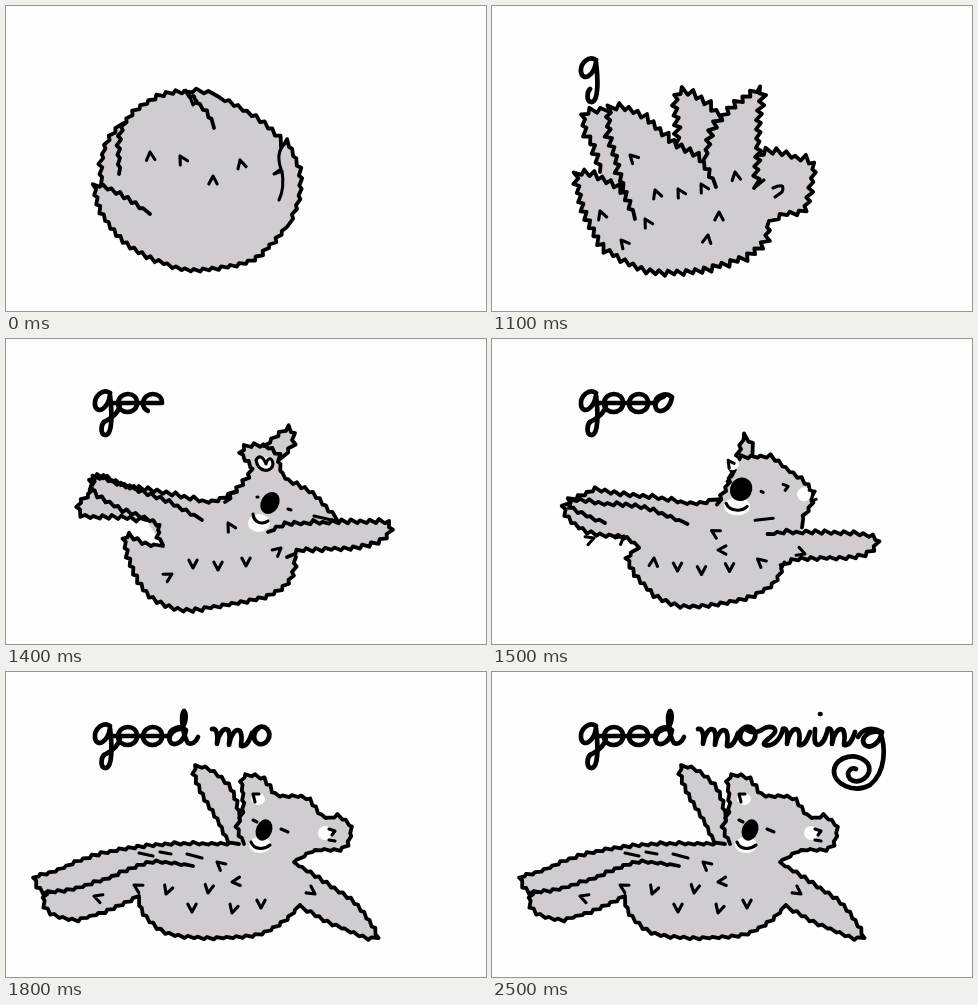
Write an HTML page that moves like this. It is 480 px wide and 305 px high and loops after 2.6 s.

```html
<!DOCTYPE html>
<html lang="en">
<meta charset="utf-8">
<title>good morning</title>
<style>
html, body { margin: 0; height: 100%; overflow: hidden; background: #fefdfe; }
svg { display: block; width: 100vw; height: 100vh; fill: none; stroke: #000; stroke-width: 3.8; stroke-linecap: round; stroke-linejoin: round; }
#fill { fill: #d0ccd0; stroke: none; }
#marks, #face { stroke-width: 3.1; }
#text { stroke-width: 4.7; }
.white { fill: #fff; stroke: none; }
.nose { fill: #000; stroke: none; }
</style>
<svg viewBox="0 0 480 305">
  <path id="fill"/><path id="line"/><path id="marks"/><g id="face"/><g id="text"/>
</svg>
<script>
const LOOP = 2600, STEP = 100, SAMPLES = 80;
const $ = id => document.getElementById(id);
const points = s => s.split(' ').map(p => p.split(',').map(Number));
const lerp = (a, b, u) => a.map((v, i) => v + (b[i] - v) * u);
const noise = n => { const v = Math.sin(n * 127.1) * 43758.5; return v - Math.floor(v); };

// Evenly spaced points along a line.
function resample(line, n) {
  const dist = [0];
  for (let i = 1; i < line.length; i++)
    dist.push(dist[i - 1] + Math.hypot(line[i][0] - line[i - 1][0], line[i][1] - line[i - 1][1]));
  const total = dist[dist.length - 1];
  n = n || Math.max(4, Math.round(total / 9));
  let i = 1;
  return Array.from({ length: n }, (_, k) => {
    const at = total * k / (n - 1);
    while (i < line.length - 1 && dist[i] < at) i++;
    return lerp(line[i - 1], line[i], (at - dist[i - 1]) / (dist[i] - dist[i - 1]));
  });
}

// Cardinal spline through the key points.
function smooth(keys) {
  const out = [], key = i => keys[Math.max(0, Math.min(keys.length - 1, i))];
  for (let i = 0; i < keys.length - 1; i++)
    for (let u = 0; u < 1; u += .125) {
      const [p, a, b, n] = [-1, 0, 1, 2].map(d => key(i + d)), v = 1 - u;
      out.push(a.map((_, c) => a[c] + (b[c] - a[c]) * u * u * (3 - 2 * u)
        + .35 * u * v * (v * (b[c] - p[c]) - u * (n[c] - a[c]))));
    }
  out.push(key(keys.length));
  return resample(out, SAMPLES);
}

// Jagged tufts on the outer side of a counterclockwise line.
function fur(line, size, seed) {
  const base = resample(line), last = base.length - 1;
  return base.flatMap((p, i) => {
    if (i === 0 || i === last) return [p];
    const [ax, ay] = base[i - 1], [bx, by] = base[i + 1];
    const len = Math.hypot(bx - ax, by - ay) || 1;
    const shift = ([x, y], d) => [x - (by - ay) / len * d, y + (bx - ax) / len * d];
    const tip = size * (.2 + .8 * noise(seed * 50 + i));
    return [shift(p, tip), shift(lerp(p, base[i + 1], .3), -size * .4)];
  });
}

const ellipse = (kind, x, y, rx, ry, turn = 0) =>
  `<ellipse class="${kind}" cx="${x}" cy="${y}" rx="${rx}" ry="${ry}" transform="rotate(${turn} ${x} ${y})"/>`;
const detail = (lines, whites = [], nose) =>
  whites.map(w => ellipse('white', ...w)).join('') + (nose ? ellipse('nose', ...nose) : '') + `<path d="${lines}"/>`;

// Every part runs counterclockwise; a mark is x, y and the direction it opens to.
const PARTS = ['farLeg', 'body', 'head', 'nearArm', 'farArm', 'nearLeg'], HEAD = 2;
const pose = (time, tuft, keys, marks, face) => ({
  time, tuft, face, marks: points(marks), parts: PARTS.map(k => smooth(points(keys[k])))
});

const poses = [
  pose(900, 3, {
    farLeg: '118,117 106,128 98,142 95,160 95,178',
    nearLeg: '208,122 203,109 191,96 178,86 160,88 138,98 118,117 113,140 113,168',
    farArm: '213,91 200,86 178,85',
    nearArm: '275,141 270,128 245,108 213,91',
    head: '281,221 293,195 294,166 281,134 275,141',
    body: '144,208 118,191 89,178 97,210 126,242 180,264 245,255 281,221'
  }, '144,146,85 174,150,60 207,170,90 234,154,75',
  detail('M276 141C271 148 273 158 275 163L268 168L276 165C278 178 276 188 273 194M183 88L187 99L191 95')),

  pose(1100, 5, {
    farLeg: '118,106 93,105 92,122 103,143 108,166',
    nearLeg: '224,181 208,152 182,138 160,117 140,104 118,102 117,128 124,153 131,184',
    farArm: '229,113 212,95 187,84 183,104 187,120 184,138',
    nearArm: '262,182 266,140 266,110 270,82 240,102 222,122 212,153',
    head: '277,215 292,208 312,206 318,182 323,159 300,150 280,145 265,149',
    body: '143,213 130,185 110,173 85,166 90,200 112,242 155,265 205,265 255,250 275,232 277,215'
  }, '138,149,45 163,184,70 186,183,60 243,166,80 209,178,60 153,213,60 227,206,90 216,229,100 108,205,70 129,234,50',
  detail('M262 182L272 174M281 182Q294 176 290 186L283 191')),

  pose(1400, 3, {
    farLeg: '231,152 205,163 160,154 118,147 90,137 85,155 71,164 78,178 105,177 140,181',
    nearLeg: '196,181 165,164 128,150 90,136 84,148 105,165 155,186 149,194 157,206',
    farArm: '274,120 287,105 286,88 272,96 258,107',
    nearArm: '281,218 292,211 345,209 378,200 385,184 350,183 300,184 276,186 262,193',
    head: '331,181 308,155 278,138 270,112 250,106 233,112 247,130 234,148 219,163',
    body: '157,207 138,205 118,195 125,226 142,256 175,271 220,266 262,257 284,242 290,218'
  }, '187,229,-90 212,231,-90 240,227,-90 222,184,60 275,209,140 166,235,150',
  detail('M251 158h1M282 170l3 1M247 175C248 184 256 186 262 182M250 121C252 134 266 134 267 125C266 118 262 118 260 125C257 117 253 116 250 121M308 177L330 182',
    [[258, 125, 8, 7], [253, 184, 11, 9]], [264, 164, 9, 11.5, 30])),

  pose(1600, 2.5, {
    farLeg: '222,169 165,163 115,163 66,155 72,175 86,187',
    nearLeg: '195,189 145,177 100,185 54,185 60,207 85,216 120,206 137,211',
    farArm: '247,110 238,96 218,92 215,112 220,140 221,168',
    nearArm: '296,234 320,228 370,229 388,215 365,206 310,202 289,197',
    head: '289,196 294,185 330,182 350,170 352,153 332,143 320,147 300,129 270,128 255,112 236,114 240,140 231,168',
    body: '137,211 145,230 165,250 205,264 250,261 280,246 295,229'
  }, '184,235,-90 207,240,-90 235,238,-90 217,199,0 256,231,-60 158,203,40 313,215,200 102,199,160 132,197,140 226,211,0',
  detail('M247 148l2 1M281 158l2 1M303 151l5 2l-3 4M246 170C249 178 261 179 267 173M249 135L248 127L254 130M329 157l6 1l-3 5M331 168l5-2M275 187L293 185',
    [[252, 130, 7, 7], [324, 161, 7, 7], [257, 173, 13, 9]], [261, 156, 11, 12, 30])),

  pose(1800, 2, {
    farLeg: '233,172 165,172 112,178 75,188 42,202 28,203 35,220 47,220',
    nearLeg: '187,194 145,190 100,207 60,219 38,221 42,240 70,248 105,237 133,224',
    farArm: '234,148 226,118 205,98 187,95 196,122 210,145 222,170',
    nearArm: '294,233 320,249 364,267 371,262 350,232 318,210 288,190',
    head: '290,188 310,178 338,177 346,156 333,144 317,146 300,125 270,124 258,107 236,104 238,136 231,155 238,172',
    body: '133,224 136,240 160,261 205,266 255,262 283,245 294,233'
  }, '186,240,-90 226,241,-75 255,236,-90 211,190,40 226,210,-5 160,222,-70 309,222,215 88,224,20 128,213,30 202,221,-80',
  detail('M247 148l4 2M275 157l7 3M245 170C248 178 258 178 264 173M249 130L247 122L253 122M323 157l6 2l-3 4M323 168l6 1M133 181L147 184M154 180L165 182M181 182L196 186',
    [[252, 127, 7, 6], [319, 161, 7, 7], [254, 173, 11, 8]], [258, 158, 8, 11, 22]))
];

// Shared letter shapes; each letter has its path and the start and end of its writing in ms.
const roundO = x => `M${x} 64h24c0 -12 -18 -12 -19 0c0 12 19 12 19 0`;
const hump = 'c1 -9 7 -18 11 -14c3 5 1 10 1 15', exit = 'c5 1 8 -4 11 -13';
const n = x => `M${x} 57c4 -2 5 6 4 15${hump}${exit}`;
const letters = [
  ['M104 54C97 49 88 57 89 66C91 76 102 70 104 56C106 72 107 97 99 96C94 95 95 86 98 83', 885, 1100],
  ['M98 83Q114 75 114 64' + roundO(107).replace('M', 'L'), 1100, 1270],
  [roundO(132), 1270, 1440],
  ['M157 64L163 64C164 56 174 53 180 58C178 70 170 74 165 71C160 64 168 57 175 57C180 52 181 42 178 39C174 42 177 64 182 71C186 73 190 70 192 65', 1440, 1560],
  [`M206 57c5 -1 6 6 5 15${hump}${hump}${exit}`, 1577, 1700],
  ['M246 64C248 56 256 52 261 57C267 64 260 74 253 72C246 69 247 60 253 56', 1700, 1800],
  ['M253 56C258 62 266 61 271 57C276 53 285 55 283 60C281 65 268 71 273 73C280 75 288 69 291 57', 1800, 1900],
  [n(291), 1900, 2000],
  ['M323 57C323 64 321 72 326 73C332 72 334 64 336 57', 2000, 2090],
  ['M328 42h.5', 2050, 2100],
  [n(336), 2100, 2200],
  ['M366 65C370 57 380 54 390 60C388 72 378 77 373 73C367 67 376 58 388 60', 2200, 2300],
  ['M388 60C394 75 394 100 378 113C362 122 341 112 342 98C344 84 366 79 376 92C382 104 366 114 358 107C353 100 359 95 364 97', 2300, 2500]
];
$('text').innerHTML = letters.map(([d]) => `<path pathLength="1" d="${d}"/>`).join('');

const toPath = line => 'M' + line.map(p => p.map(v => v.toFixed(1))).join('L');
const centre = line => line.reduce((s, p) => [s[0] + p[0] / SAMPLES, s[1] + p[1] / SAMPLES], [0, 0]);

function tuftMark([x, y, turn]) {
  const end = d => { const a = (turn + d) * Math.PI / 180; return [x + 9 * Math.cos(a), y + 9 * Math.sin(a)]; };
  return toPath([end(-28), [x, y], end(28)]);
}

function draw(t) {
  const k = Math.max(0, poses.filter(p => p.time <= t).length - 1);
  const a = poses[k], b = poses[k + 1] || a;
  const u = a === b ? 0 : Math.max(0, (t - a.time) / (b.time - a.time));
  const near = u < .5 ? a : b;
  const [tuft] = lerp([a.tuft], [b.tuft], u);
  const bare = a.parts.map((part, i) => part.map((p, j) => lerp(p, b.parts[i][j], u)));
  const parts = bare.map((part, i) => fur(part, tuft, i + 1));

  // The silhouette joins all parts but the near leg; each part also fills its own loop.
  $('fill').setAttribute('d', toPath(parts.slice(0, -1).flat()) + parts.map(p => toPath(p) + 'Z').join(''));
  $('line').setAttribute('d', parts.map(toPath).join(''));
  $('marks').setAttribute('d', near.marks.map((m, i) =>
    tuftMark(lerp(a.marks[i] || m, b.marks[i] || m, u))).join(''));

  const from = centre(near.parts[HEAD]), to = centre(bare[HEAD]);
  $('face').innerHTML = near.face;
  $('face').setAttribute('transform', `translate(${to[0] - from[0]} ${to[1] - from[1]})`);

  letters.forEach(([, start, end], i) => {
    const p = Math.min(1, (t - start) / (end - start)), { style } = $('text').children[i];
    style.display = p > 0 ? '' : 'none';
    style.strokeDasharray = p < 1 ? `${Math.max(p, 0)} 2` : 'none';
  });
}

const begin = performance.now();
let shown = -1;
function tick() {
  const t = Math.floor((performance.now() - begin) % LOOP / STEP) * STEP;
  if (t !== shown) draw(shown = t);
  requestAnimationFrame(tick);
}
tick();
</script>
</html>
```
